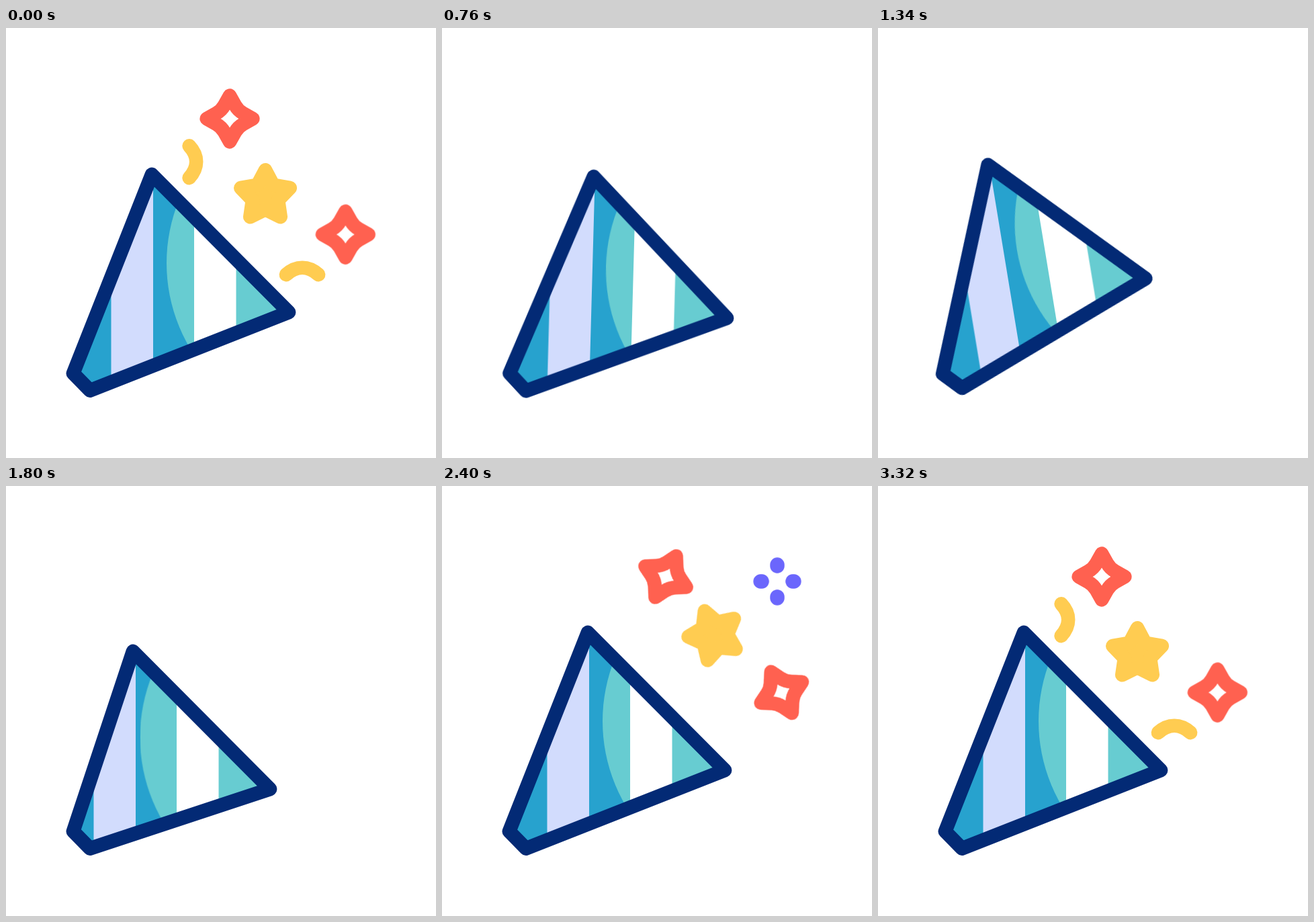
Recreate the animation shown at these times as an HTML page. Size 640 by 640 pixels, loop 3600 ms.

```html
<!DOCTYPE html>
<html lang="en">
<head>
<meta charset="utf-8">
<title>Party popper</title>
<style>
  html, body { margin: 0; width: 100%; height: 100%; overflow: hidden; background: #fff; }
  svg { display: block; width: 100%; height: 100%; }

  svg * {
    animation-duration: 3600ms;
    animation-iteration-count: infinite;
    animation-timing-function: cubic-bezier(.33, 0, .67, 1);
  }
  .ink { fill: none; stroke-width: 20.8; stroke-linecap: round; stroke-linejoin: round; }
  .navy { stroke: #032a75; }
  .red { stroke: #ff6150; }
  .gold { stroke: #ffcc51; }
  .violet { stroke: #6b66fc; }

  /* Cone: tilt, then recoil and shot */
  .cone { transform-origin: 103px 537px; animation-name: tilt; }
  @keyframes tilt {
    0%, 11.67% { transform: rotate(0deg); }
    18.06% { transform: rotate(13deg); }
    26.67%, 30.56% { transform: rotate(-26deg); }
    41.8%, 100% { transform: rotate(0deg); }
  }
  .body { animation-name: recoil; }
  @keyframes recoil {
    0%, 41.8% { d: path("M217 218L421 423L125 539.5L100 514Z"); }
    50%, 53.33% { d: path("M189 246L393 451L125 539.5L100 514Z"); }
    57.5% { d: path("M255 180L459 385L125 539.5L100 514Z"); }
    62.8%, 100% { d: path("M217 218L421 423L125 539.5L100 514Z"); }
  }
  .slide { animation-name: slide; }
  @keyframes slide {
    0%, 41.8% { transform: translate(0, 0); }
    50%, 53.33% { transform: translate(var(--in)); }
    50%, 53.33% { transform: translate(var(--ix), var(--iy)); }
    57.5% { transform: translate(var(--ox), var(--oy)); }
    62.8%, 100% { transform: translate(0, 0); }
  }
  .bands { --ix: -26px; --iy: 26px; --ox: 36px; --oy: -36px; }
  .shine { --ix: -39.5px; --iy: 24px; --ox: 52px; --oy: -32px; }

  /* Confetti: shrink away, later fly out of the cone */
  .pop { animation-name: pop; }
  @keyframes pop {
    0%, .5% { transform: translate(var(--x), var(--y)) scale(1); }
    10.8% { transform: translate(var(--x), var(--y)) scale(0); }
    10.81%, 59.4% {
      transform: translate(330px, 309px) scale(0);
      animation-timing-function: cubic-bezier(.22, .6, .36, 1);
    }
    66.4% { transform: translate(var(--ax, var(--x)), var(--ay, var(--y))) scale(1); }
    86%, 100% { transform: translate(var(--x), var(--y)) scale(1); }
  }
  .spin { animation-name: spin; }
  @keyframes spin {
    0%, 58.32% { transform: rotate(0deg); }
    58.33% { transform: rotate(var(--r)); animation-timing-function: cubic-bezier(.215, .61, .355, 1); }
    84.7%, 100% { transform: rotate(0deg); }
  }

  .arc { stroke-dasharray: 1 2; animation-name: draw; }
  @keyframes draw {
    0%, .5% { stroke-dashoffset: 0; stroke-width: 20.8; }
    9.5% { stroke-dashoffset: .98; stroke-width: 20.8; }
    10.8%, 71% { stroke-dashoffset: .98; stroke-width: 0; }
    72.5% { stroke-dashoffset: .98; stroke-width: 20.8; }
    82%, 100% { stroke-dashoffset: 0; stroke-width: 20.8; }
  }

  .burst { animation-name: launch; }
  @keyframes launch {
    0%, 60.2% {
      transform: translate(400px, 239px) scale(0);
      animation-timing-function: cubic-bezier(.22, .6, .36, 1);
    }
    66.6% { transform: translate(499px, 142px) scale(1); }
    80%, 100% { transform: translate(499px, 149px) scale(1); }
  }
  .dot { animation-name: scatter; }
  @keyframes scatter {
    0%, 60.2% { transform: translateY(0); stroke-width: 21.5; animation-timing-function: linear; }
    66.67% {
      transform: translateY(-23.5px); stroke-width: 21.5;
      animation-timing-function: cubic-bezier(.25, .5, .5, 1);
    }
    77% { transform: translateY(-108px); stroke-width: 16; }
    88%, 100% { transform: translateY(-116px); stroke-width: 0; }
  }
</style>
</head>
<body>
<svg viewBox="0 0 640 640">
  <defs>
    <clipPath id="inside"><path class="body" d="M217 218L421 423L125 539.5L100 514Z"/></clipPath>
    <path id="gem" d="M0-34.2L8-20Q12.3-12.3 20-8L34.2 0L20 8Q12.3 12.3 8 20L0 34.2L-8 20Q-12.3 12.3-20 8L-34.2 0L-20-8Q-12.3-12.3-8-20Z"/>
  </defs>

  <g class="burst">
    <g><path class="ink violet dot" d="M0-1V1"/></g>
    <g transform="rotate(90)"><path class="ink violet dot" d="M0-1V1"/></g>
    <g transform="rotate(180)"><path class="ink violet dot" d="M0-1V1"/></g>
    <g transform="rotate(270)"><path class="ink violet dot" d="M0-1V1"/></g>
  </g>

  <g class="pop" style="--x:333px;--y:135px">
    <g class="spin" style="--r:90deg"><use href="#gem" class="ink red"/></g>
  </g>
  <g class="pop" style="--x:505.3px;--y:307.3px">
    <g class="spin" style="--r:-90deg"><use href="#gem" class="ink red"/></g>
  </g>
  <g class="pop" style="--x:386px;--y:250px;--ax:405px;--ay:222px">
    <g class="spin" style="--r:-72deg">
      <path class="ink gold" style="fill:#ffcc51" d="M0-38.5L11.8-16.2L36.6-11.9L19 6.2L22.6 31.1L0 20L-22.6 31.1L-19 6.2L-36.6-11.9L-11.8-16.2Z"/>
    </g>
  </g>

  <path class="ink gold arc" pathLength="1" d="M272.7 223C286.5 208 286.5 190 272.7 175.5"/>
  <path class="ink gold arc" pathLength="1" d="M417 367C432 353.5 450 353.5 465 367"/>

  <g class="cone">
    <g clip-path="url(#inside)">
      <rect width="640" height="640" fill="#27a2ce"/>
      <circle class="slide shine" cx="486.7" cy="350" r="247.7" fill="#67ccd1"/>
      <g class="slide bands">
        <path d="M156.5 0H219V640H156.5Z" fill="#d2dcfd"/>
        <path d="M280 0H342.5V640H280Z" fill="#fff"/>
      </g>
    </g>
    <path class="ink navy body" d="M217 218L421 423L125 539.5L100 514Z"/>
  </g>
</svg>
</body>
</html>
```
